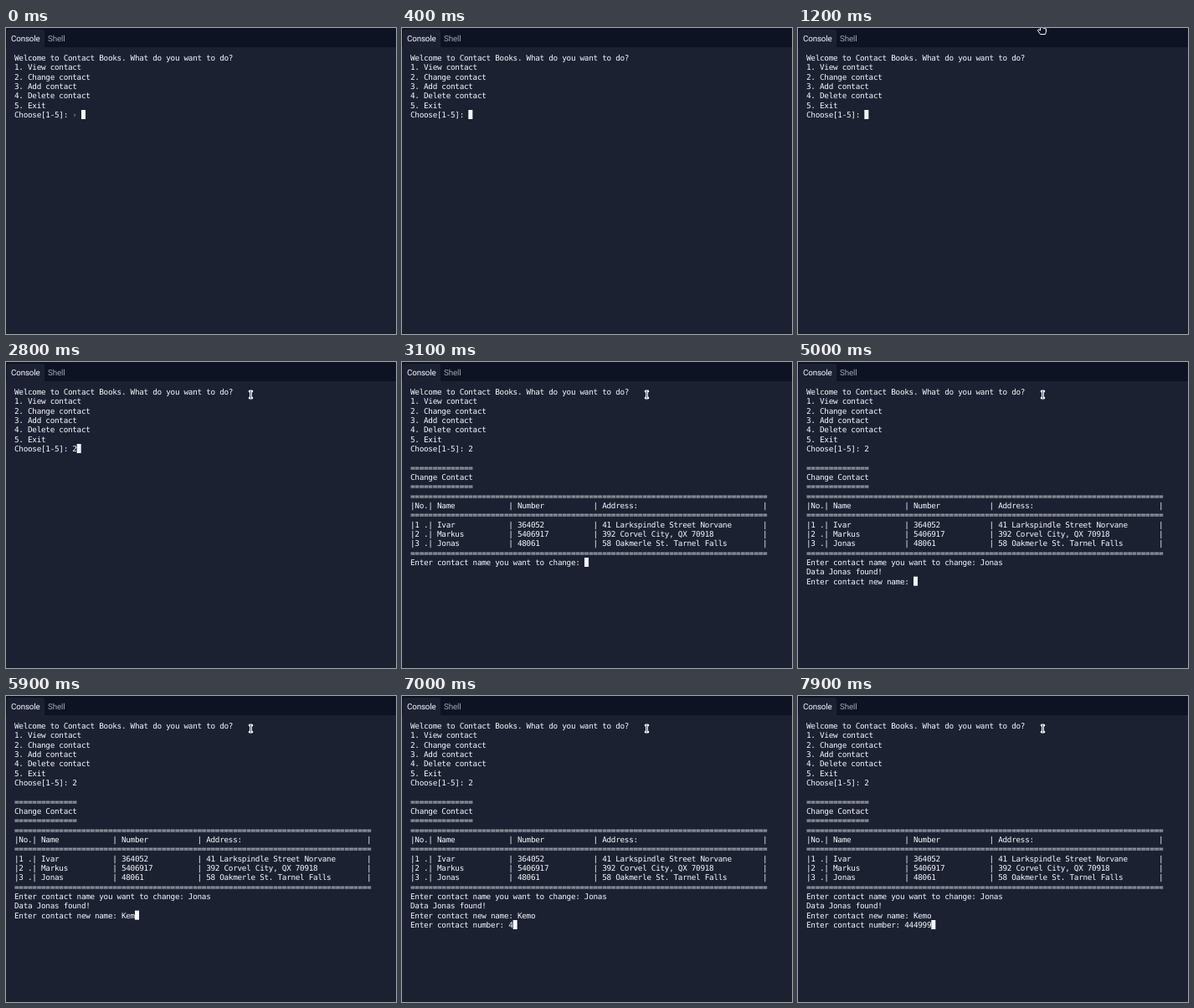
An HTML page for the animation above (8 s loop, 466 by 366 pixels).

```html
<!DOCTYPE html>
<html lang="en">
<head>
<meta charset="utf-8">
<title>Contact book console</title>
<style>
  html, body { margin: 0; width: 100%; height: 100%; overflow: hidden; background: #1c2132; }
  body { position: relative; color: #f5f9fc; text-rendering: geometricPrecision; }
  header { height: 23px; background: #0d1322; font: 9.8px/24px Roboto, sans-serif; letter-spacing: -.15px; }
  header span { position: absolute; left: 50px; top: 2px; color: #a0a5ad; }
  header .active { left: 1px; width: 40px; height: 21px; padding-left: 5px;
    border-radius: 3px 3px 0 0; background: #1c2132; color: #f5f9fc; }
  pre { position: absolute; left: 10px; top: 31px; margin: 0;
    font: 9.333px/11.333px "DejaVu Sans Mono", monospace; letter-spacing: -.286px; }
  pre i { font-style: normal; font-weight: bold; color: #b07a35; }
  #caret { position: absolute; left: 10px; top: 30px; width: 5.3px; height: 11.3px; background: #f5f9fc; }
  svg { position: absolute; left: 0; top: 0; }
</style>
</head>
<body>
<header><span class="active">Console</span><span>Shell</span></header>
<pre id="screen"></pre>
<div id="caret"></div>
<svg width="466" height="366" fill="none" stroke-linejoin="round" stroke-linecap="round">
  <path id="hand" d="M289.5 -4V3L287.5 1.5 286.5 3 289.5 7.5H295.5L296.5 4V1L294.5 .5 293 0 291.5 -.5V-4"
    fill="#0d1322" stroke="#f5f9fc"/>
  <g id="beam">
    <path id="bar" d="M291 -4H294M292.5 -4V4M291 4H294" stroke="#f5f9fc" stroke-width="2.4"/>
    <use href="#bar"/>
    <path d="M292.5 -4V4" stroke="#1c2132" stroke-width=".7"/>
  </g>
</svg>
<script>
const LOOP = 8000, CHAR = 5.333, LINE = 11.333;
const [screen, caret, hand, beam] = ['screen', 'caret', 'hand', 'beam'].map(id => document.getElementById(id));

const row = (no, name, number, address) =>
  `|${no}| ${name.padEnd(16)}| ${number.padEnd(17)}| ${address.padEnd(36)}|\n`;
const rule = n => '='.repeat(n) + '\n';

const menu = 'Welcome to Contact Books. What do you want to do?\n1. View contact\n2. Change contact\n' +
  '3. Add contact\n4. Delete contact\n5. Exit\nChoose[1-5]: ';
const table = '\n\n' + rule(14) + 'Change Contact\n' + rule(14) + rule(80) +
  row('No.', 'Name', 'Number', 'Address:') + rule(80) +
  row('1 .', 'Ivar', '364052', '41 Larkspindle Street Norvane') +
  row('2 .', 'Markus', '5406917', '392 Corvel City, QX 70918') +
  row('3 .', 'Jonas', '48061', '58 Oakmerle St. Tarnel Falls') +
  rule(80) + 'Enter contact name you want to change: ';

// Each event appends text to the console at its time.
const type = (start, step, text) => [...text].map((c, i) => [start + i * step, c]);
const events = [
  [0, menu],
  [2800, '2'],
  [3100, table],
  ...type(4300, 100, 'Jonas'),
  [4900, '\nData Jonas found!\nEnter contact new name: '],
  ...type(5500, 200, 'Kem'),
  [6000, 'o'],
  [6400, '\nEnter contact number: '],
  ...type(6900, 150, '444999'),
];

// The pointer drops from the tab bar onto the console.
function pointerY(t) {
  if (t < 1400) return 22;
  if (t < 1500) return 34;
  return t < 2200 ? 38 : 39;
}

let shown;
function draw() {
  const t = performance.now() % LOOP;
  const prompting = t < 100;
  const text = events.filter(e => e[0] <= t).map(e => e[1]).join('');
  const html = text + (prompting ? '<i>›</i> ' : '');
  if (html !== shown) screen.innerHTML = shown = html;

  const lines = text.split('\n');
  const col = lines.at(-1).length + (prompting ? 2 : 0);
  caret.style.transform = `translate(${col * CHAR}px, ${(lines.length - 1) * LINE}px)`;

  hand.style.display = t >= 1200 && t < 1300 ? '' : 'none';
  beam.style.display = t >= 1300 ? '' : 'none';
  beam.setAttribute('transform', `translate(0 ${pointerY(t)})`);
  requestAnimationFrame(draw);
}
draw();
</script>
</body>
</html>
```
